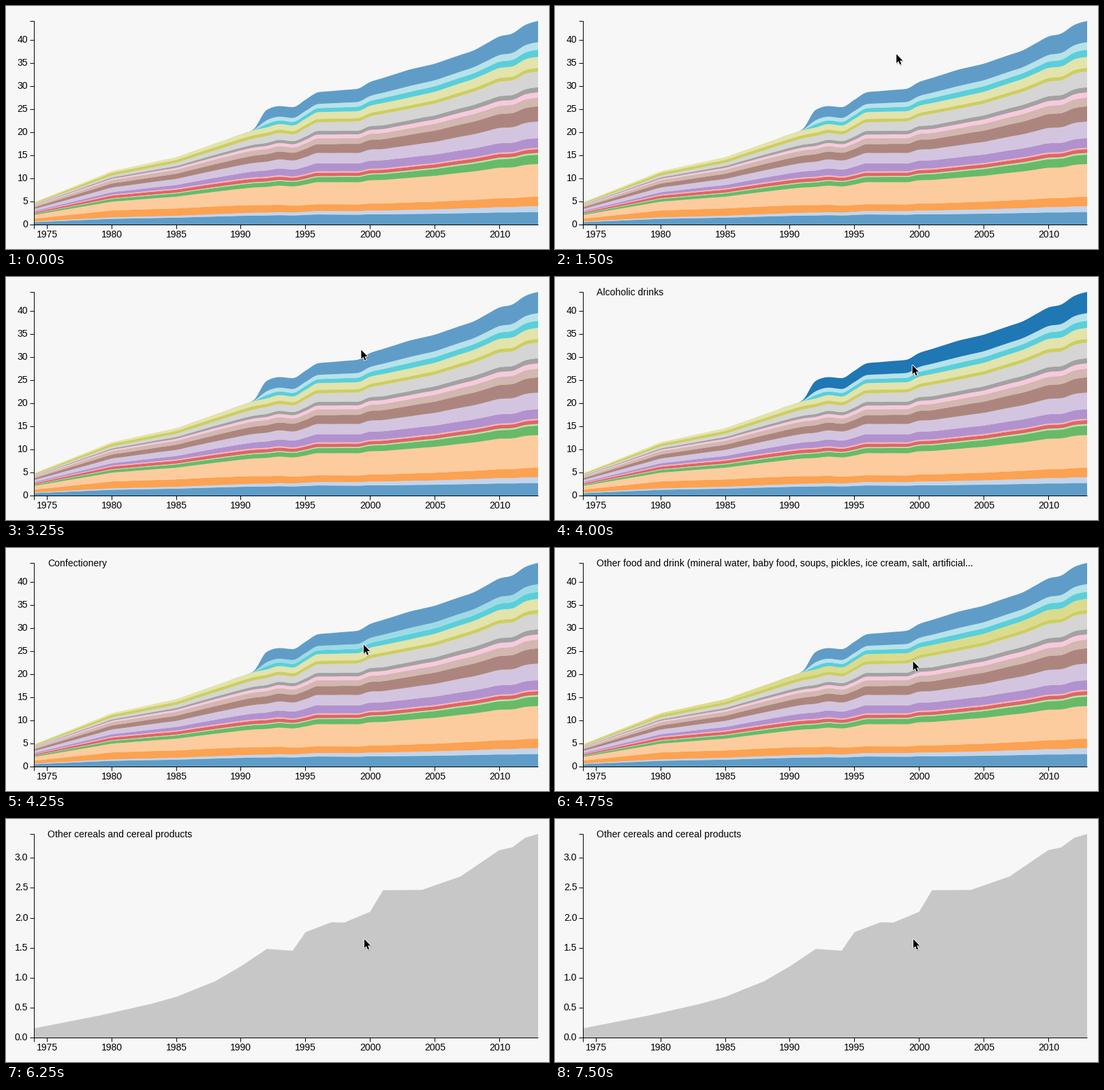
Recreate the animation shown at these times as a matplotlib script. Size 797 px wide and 358 px high, loop 8 s.

```python
import numpy as np
import matplotlib.pyplot as plt
from matplotlib.animation import FuncAnimation
from matplotlib.patches import Polygon

W, H, DPI = 797, 358, 100
PX = 72 / DPI
LEFT, RIGHT, BASE, HEIGHT = 41, 780.5, 321.5, 300
STEP_MS, STEPS = 250, 32
CUT = 25  # step at which the single layer replaces the stack
PALETTE = plt.cm.tab20.colors
YEARS = np.arange(1974, 2014)
STACK_UNIT, CEREAL_UNIT = 6.8, HEIGHT / 3.4

plt.rcParams["font.family"] = "Liberation Sans"
plt.rcParams["font.size"] = 14 * PX


def through(at, *points):
    """Straight lines through (position, value) points."""
    xs, ys = zip(*points)
    return np.interp(at, xs, ys)


def build_layers():
    """Layer thicknesses in pixels, bottom to top."""
    total = through(
        YEARS, (1974, 33), (1980, 78.5), (1985, 99.5), (1990, 133), (1991, 141),
        (1992, 169), (1993, 174.5), (1994, 173), (1996, 195), (1999, 200),
        (2000, 210), (2003, 228), (2005, 237), (2008, 256.5), (2010, 277),
        (2011, 281.5), (2012, 294), (2013, HEIGHT))
    cereals = STACK_UNIT * through(
        YEARS, (1974, .155), (1979, .365), (1983, .56), (1985, .68), (1988, .94),
        (1990, 1.19), (1992, 1.48), (1994, 1.45), (1995, 1.76), (1997, 1.925),
        (1998, 1.92), (2000, 2.1), (2001, 2.46), (2004, 2.465), (2007, 2.69),
        (2010, 3.13), (2011, 3.175), (2012, 3.335), (2013, 3.4))
    drinks = through(YEARS, (1990, 0), (1991, 2), (1992, 26), (1994, 27),
                     (1999, 33), (2003, 41), (2008, 42), (2013, 53))
    food = total - drinks - cereals

    # Share of the food in per mille in 1980, 1996 and 2013
    shares = [
        (115, 98, 83), (27, 33, 38), (141, 66, 63), (174, 214, 215),
        (54, 49, 63), (13, 10, 11), (54, 33, 25), (20, 13, 9),
        (47, 79, 63), (94, 99, 110), (81, 86, 101), (67, 56, 58),
        (27, 36, 34), (27, 36, 34), (54, 33, 25), (33, 66, 72)]
    parts = np.array([np.interp(YEARS, (1980, 1996, 2013), s) for s in shares])
    parts *= food / parts.sum(axis=0)
    top = [drinks * k for k in (.2, .21, .59)]
    return [*parts[:14], cereals, *parts[14:], *top]


def smooth(y, n=10):
    """Monotone cubic through yearly values, n points a year."""
    d = np.diff(y)
    a, b = d[:-1], d[1:]
    m = np.zeros(len(y))
    m[1:-1] = (np.sign(a) + np.sign(b)) * np.minimum(
        np.minimum(abs(a), abs(b)), abs(a + b) / 4)
    m[0] = (3 * d[0] - m[1]) / 2
    m[-1] = (3 * d[-1] - m[-2]) / 2
    t = np.linspace(0, len(y) - 1, (len(y) - 1) * n + 1)
    i = np.minimum(t.astype(int), len(y) - 2)
    u = t - i
    return (y[i] * (1 + 2 * u) * (1 - u) ** 2 + m[i] * u * (1 - u) ** 2
            + y[i + 1] * u * u * (3 - 2 * u) + m[i + 1] * u * u * (u - 1))


fig = plt.figure(figsize=(W / DPI, H / DPI), dpi=DPI, facecolor="#f7f7f7")
ax = fig.add_axes([0, 0, 1, 1])
ax.set_xlim(0, W)
ax.set_ylim(H, 0)
ax.axis("off")


def area(low, high, color, alpha):
    x = np.linspace(LEFT, RIGHT, len(low))
    return ax.fill_between(x, BASE - low, BASE - high, color=color,
                           alpha=alpha, linewidth=0)


def line(xs, ys):
    return ax.plot(np.array(xs) + .5, np.array(ys) + .5, color="black",
                   lw=PX, solid_capstyle="butt", solid_joinstyle="miter")[0]


def y_ticks(values, unit, fmt):
    parts = []
    for v in values:
        y = int(BASE - v * unit)
        parts.append(line([LEFT - 6, LEFT], [y, y]))
        parts.append(ax.text(32.3, y + 5, fmt.format(v), ha="right", va="baseline"))
    return parts


sizes = build_layers()
colors = [PALETTE[i] for i in range(20) if i != 12] + [PALETTE[0]]
edges = [smooth(e) for e in np.cumsum([0 * YEARS, *sizes], axis=0)]
stack = [area(lo, hi, c, .7) for lo, hi, c in zip(edges, edges[1:], colors)]
single = area(0 * YEARS, sizes[14] * CEREAL_UNIT / STACK_UNIT, colors[14], 1)

floor = int(BASE)
line([LEFT - 6, LEFT, LEFT, LEFT - 6],
     [floor - HEIGHT, floor - HEIGHT, floor, floor])
line([LEFT, LEFT, RIGHT], [floor + 6, floor, floor])
for year in range(1975, 2011, 5):
    x = round(LEFT + (RIGHT - LEFT) * (year - 1974) / 39)
    line([x, x], [floor, floor + 6])
    ax.text(x + .5, 341, str(year), ha="center", va="baseline")
stack_axis = y_ticks(range(0, 41, 5), STACK_UNIT, "{}")
single_axis = y_ticks(np.arange(0, 3.1, .5), CEREAL_UNIT, "{:.1f}")
label = ax.text(61.2, 27, "", va="baseline")

ARROW = np.array([(0, 0), (0, 13.2), (3, 10.4), (5.1, 15.4), (7.2, 14.5),
                  (5.1, 9.6), (9.3, 9.6)])
shadow = ax.add_patch(Polygon(ARROW, color="black", lw=1.6 * PX, alpha=.22, zorder=5))
rim = ax.add_patch(Polygon(ARROW, color="white", lw=2 * PX, zorder=6))
arrow = ax.add_patch(Polygon(ARROW, color="black", lw=0, zorder=7))

# First step of each hover: layer index and its label
HOVER = {
    0: (None, ""),
    14: (19, "Alcoholic drinks"),
    17: (18, "Confectionery"),
    18: (17, "Soft drinks"),
    19: (16, "Other food and drink (mineral water, baby food, soups, "
             "pickles, ice cream, salt, artificial..."),
    20: (14, "Other cereals and cereal products"),
}


def pointer(step):
    x = through(step, (5, 484), (7, 516.5), (12, 518), (14, 523), (20, 525))
    y = through(step, (4, -40), (5, -9.5), (6, 69.5), (7, 116.5), (9, 124),
                (10, 83), (12, 84), (14, 128), (16, 128.5), (19, 165.5),
                (21, 183.5), (22, 183), (23, 175.5))
    return np.array([x, y])


def draw(step):
    zoomed = step >= CUT
    active, text = HOVER[max(k for k in HOVER if k <= step)]
    label.set_text(text)
    for i, part in enumerate(stack):
        part.set_alpha(1 if i == active else .7)
    for part in stack + stack_axis:
        part.set_visible(not zoomed)
    for part in [single] + single_axis:
        part.set_visible(zoomed)
    body = ARROW + pointer(step) + (.9, 1.4)
    arrow.set_xy(body)
    rim.set_xy(body)
    shadow.set_xy(body + (.5, 1.2))
    return [label, single, arrow, rim, shadow, *stack, *stack_axis, *single_axis]


anim = FuncAnimation(fig, draw, frames=STEPS, interval=STEP_MS, repeat=True,
                     repeat_delay=0, blit=False)
plt.show()
```
